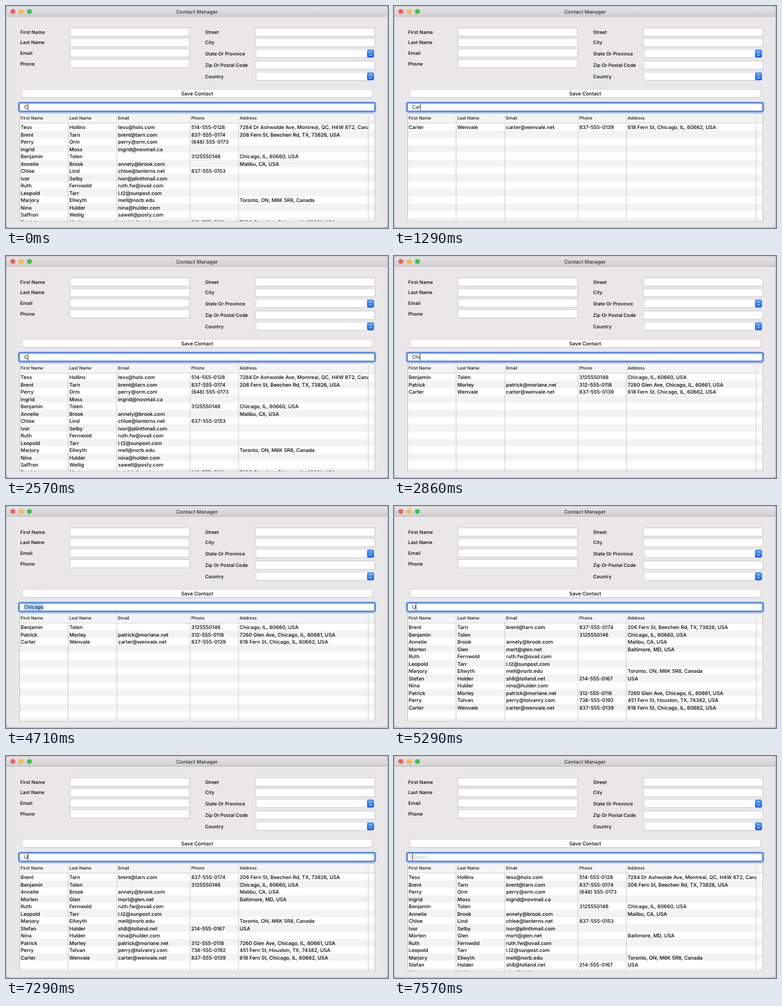
An HTML page that plays this animation: 600 px wide and 350 px high, repeating every 8 s.

```html
<!DOCTYPE html>
<html lang="en">
<head>
<meta charset="utf-8">
<title>Contact Manager</title>
<style>
  html, body { margin: 0; width: 100%; height: 100%; overflow: hidden; background: #bebcbe; }
  svg { display: block; width: 600px; height: 350px; }
  text { font-family: Inter, "Open Sans", sans-serif; font-size: 7.9px; font-weight: 500; fill: #000; text-rendering: geometricPrecision; white-space: pre; }
  .label { font-size: 7.5px; }
  .head { font-size: 6.8px; fill: #111; }
  .query { font-size: 7.7px; font-weight: 400; }
</style>
</head>
<body>
<svg id="stage" viewBox="0 0 600 350" xmlns="http://www.w3.org/2000/svg">
  <defs>
    <linearGradient id="bar" x2="0" y2="1"><stop stop-color="#e5e3e5"/><stop offset="1" stop-color="#d0ced0"/></linearGradient>
    <linearGradient id="blue" x2="0" y2="1"><stop stop-color="#559ff8"/><stop offset="1" stop-color="#0d5ff0"/></linearGradient>
    <clipPath id="win"><rect x="1" y="0.8" width="598" height="348" rx="4"/></clipPath>
    <clipPath id="body"><rect x="22" y="185" width="547" height="154"/></clipPath>
  </defs>
</svg>
<script>
const LOOP = 8000, PITCH = 11.5, TOP = 185, TEXT_X = 28.4;
const COLS = [23, 99.5, 176, 291, 367];
const EDGES = [97.5, 174, 289, 365, 569];

const contacts = [
  'Tess|Hollins|tess@hols.com|514-555-0128|7284 Dr Ashwolde Ave, Montreal, QC, H4W 8T2, Canada',
  'Brent|Tarn|brent@tarn.com|837-555-0174|206 Fern St, Beechen Rd, TX, 73826, USA',
  'Perry|Orm|perry@orm.com|(648) 555-0173|',
  'Ingrid|Moss|ingrid@novmail.ca||',
  'Benjamin|Tolen||3125550146|Chicago, IL, 60660, USA',
  'Annelie|Brook|annely@brook.com||Malibu, CA, USA',
  'Chloe|Lind|chloe@lanterns.net|837-555-0153|',
  'Ivor|Selby|ivor@plinthmail.com||',
  'Morten|Glen|mort@glen.net||Baltimore, MD, USA',
  'Ruth|Fernwold|ruth.fw@ovail.com||',
  'Leopold|Tarr|l.t2@sunpost.com||',
  'Marjory|Ellwyth|mell@norb.edu||Toronto, ON, M6K 5R8, Canada',
  'Stefan|Holder|sh8@tolland.net|214-555-0167|USA',
  'Nina|Hulder|nina@hulder.com||',
  'Saffron|Wellig|sawell@posty.com||',
  'Patrick|Morley|patrick@morlane.net|312-555-0118|7260 Glen Ave, Chicago, IL, 60661, USA',
  'Perry|Tolvan|perry@tolvanry.com|738-555-0192|451 Fern St, Houston, TX, 74382, USA',
  'Carter|Wenvale|carter@wenvale.net|837-555-0139|618 Fern St, Chicago, IL, 60662, USA'
].map(line => line.split('|'));

// [start ms, search text, 'caret' | 'select' | '']
const steps = [
  [0, 'C', 'caret'], [140, 'Ca', 'caret'], [290, 'Car', 'caret'], [710, 'Car', ''],
  [1290, 'Car', 'caret'], [1710, 'Car', ''], [1860, 'Ca', 'caret'], [2000, 'C', 'caret'],
  [2140, '', 'caret'], [2570, 'C', 'caret'], [2720, 'Ch', 'caret'], [2860, 'Chi', 'caret'],
  [3000, 'Chic', 'caret'], [3140, 'Chica', 'caret'], [3430, 'Chicag', 'caret'],
  [3570, 'Chicago', 'caret'], [4140, 'Chicago', ''], [4290, 'Chicago', 'select'],
  [4860, '', 'caret'], [5290, 'U', 'caret'], [5430, 'US', 'caret'], [5710, 'USA', 'caret'],
  [6290, 'USA', ''], [6860, 'USA', 'caret'], [7000, 'US', 'caret'], [7290, 'U', 'caret'],
  [7570, '', 'caret']
];

const stage = document.getElementById('stage');

function add(parent, tag, attrs, content) {
  const node = document.createElementNS(stage.namespaceURI, tag);
  for (const key in attrs) node.setAttribute(key, attrs[key]);
  if (content !== undefined) node.textContent = content;
  return parent.appendChild(node);
}
const rect = (parent, x, y, width, height, fill, more) =>
  add(parent, 'rect', { x, y, width, height, fill, ...more });
const text = (parent, x, y, content, more) => add(parent, 'text', { x, y, ...more }, content);

function drawWindow() {
  const g = add(stage, 'g', { 'clip-path': 'url(#win)' });
  rect(g, 0, 0, 600, 350, '#e9e7e8');
  rect(g, 0, 0.8, 600, 15.4, 'url(#bar)');
  rect(g, 0, 15.8, 600, 0.8, '#b4b2b4');
  ['#fc5b57', '#fdbc40', '#33c748'].forEach((fill, i) =>
    add(stage, 'circle', { cx: 10.8 + 13 * i, cy: 8.6, r: 3.7, fill, stroke: '#0002', 'stroke-width': 0.4 }));
  text(stage, 300, 11.6, 'Contact Manager', { 'text-anchor': 'middle', style: 'fill: #333' });
}

function drawField(x, cy) {
  rect(stage, x + 0.4, cy - 6.5, 188.2, 13, '#fff', { stroke: '#c2c0c1', 'stroke-width': 0.8 });
}

function drawCombo(cy) {
  rect(stage, 392.5, cy - 6, 185.5, 12.6, '#c2c0c1', { rx: 2.5 });
  rect(stage, 392.8, cy - 6.2, 185, 12.3, '#fff', { rx: 2.4, stroke: '#cfcdce', 'stroke-width': 0.5 });
  rect(stage, 567, cy - 6.4, 11, 12.7, 'url(#blue)', { rx: 2.4 });
  add(stage, 'path', {
    d: `M570.6 ${cy - 1.5}l1.9 -2l1.9 2M570.6 ${cy + 1.3}l1.9 2l1.9 -2`,
    fill: 'none', stroke: '#fff', 'stroke-width': 1, 'stroke-linecap': 'round', 'stroke-linejoin': 'round'
  });
}

function drawForm() {
  const label = (x, cy, name) => text(stage, x, cy + 2.8, name, { class: 'label' });
  ['First Name', 'Last Name', 'Email', 'Phone'].forEach((name, i) => {
    const cy = 41 + 16.6 * i;
    label(22.3, cy, name);
    drawField(100, cy);
  });
  [['Street', 41], ['City', 57.6], ['State Or Province', 75, 1], ['Zip Or Postal Code', 93.3], ['Country', 110.8, 1]]
    .forEach(([name, cy, combo]) => {
      label(312.8, cy, name);
      combo ? drawCombo(cy) : drawField(391, cy);
    });
  rect(stage, 25, 131.8, 550.5, 12.8, '#bcbabb', { rx: 2.6 });
  rect(stage, 25.3, 131.5, 550, 12.4, '#fff', { rx: 2.4, stroke: '#cbc9ca', 'stroke-width': 0.5 });
  text(stage, 300.3, 140.7, 'Save Contact', { 'text-anchor': 'middle' });
  rect(stage, 20.3, 152.5, 559.4, 13.8, '#fff', { rx: 2.5, stroke: '#5f93e6', 'stroke-width': 3.2 });
}

function drawTable() {
  rect(stage, 21.5, 169.5, 558, 169.5, '#fff', { stroke: '#bebcbd', 'stroke-width': 0.8 });
  rect(stage, 22, 170, 557, 14.6, '#f5f4f5');
  rect(stage, 22, 184.3, 557, 0.7, '#c8c6c7');
  for (let i = 1; i < 14; i += 2) {
    const y = TOP + PITCH * i;
    rect(stage, 22, y, 557, Math.min(PITCH, 338.7 - y), '#f3f2f4');
  }
  ['First Name', 'Last Name', 'Email', 'Phone', 'Address'].forEach((name, i) => {
    text(stage, COLS[i], 179.3, name, { class: 'head' });
    rect(stage, EDGES[i] - 0.3, 172, 0.7, 10.5, '#cccacb');
    rect(stage, EDGES[i] - 0.4, TOP, 0.8, 153.7, '#c4c2c3');
  });
}

drawWindow();
drawForm();
drawTable();

const mark = rect(stage, TEXT_X, 154.2, 0, 10.6, '#b2d6fe');
const query = text(stage, TEXT_X, 162.2, '', { class: 'query' });
const caret = rect(stage, 0, 154.3, 0.8, 10.2, '#111');
const body = add(stage, 'g', { 'clip-path': 'url(#body)' });

function showRows(term) {
  const key = term.toLowerCase();
  body.replaceChildren();
  contacts
    .filter(row => row.some(cell => cell.toLowerCase().includes(key)))
    .slice(0, 14)
    .forEach((row, i) => row.forEach((cell, c) => {
      if (cell) text(body, COLS[c], 194 + PITCH * i, cell);
    }));
}

let shown;
function render(time) {
  const step = steps.findLast(([start]) => start <= time);
  if (step === shown) return;
  shown = step;
  const [, term, mode] = step;
  query.textContent = term || 'Search';
  query.style.fill = term ? '#111' : '#b9b9b9';
  const width = term ? query.getComputedTextLength() : 0;
  caret.setAttribute('x', TEXT_X + width + 0.1);
  caret.setAttribute('opacity', mode === 'caret' ? 1 : 0);
  mark.setAttribute('width', mode === 'select' ? width + 0.4 : 0);
  showRows(term);
}

const origin = performance.now();
function tick() {
  render((performance.now() - origin) % LOOP);
  requestAnimationFrame(tick);
}
tick();
</script>
</body>
</html>
```
